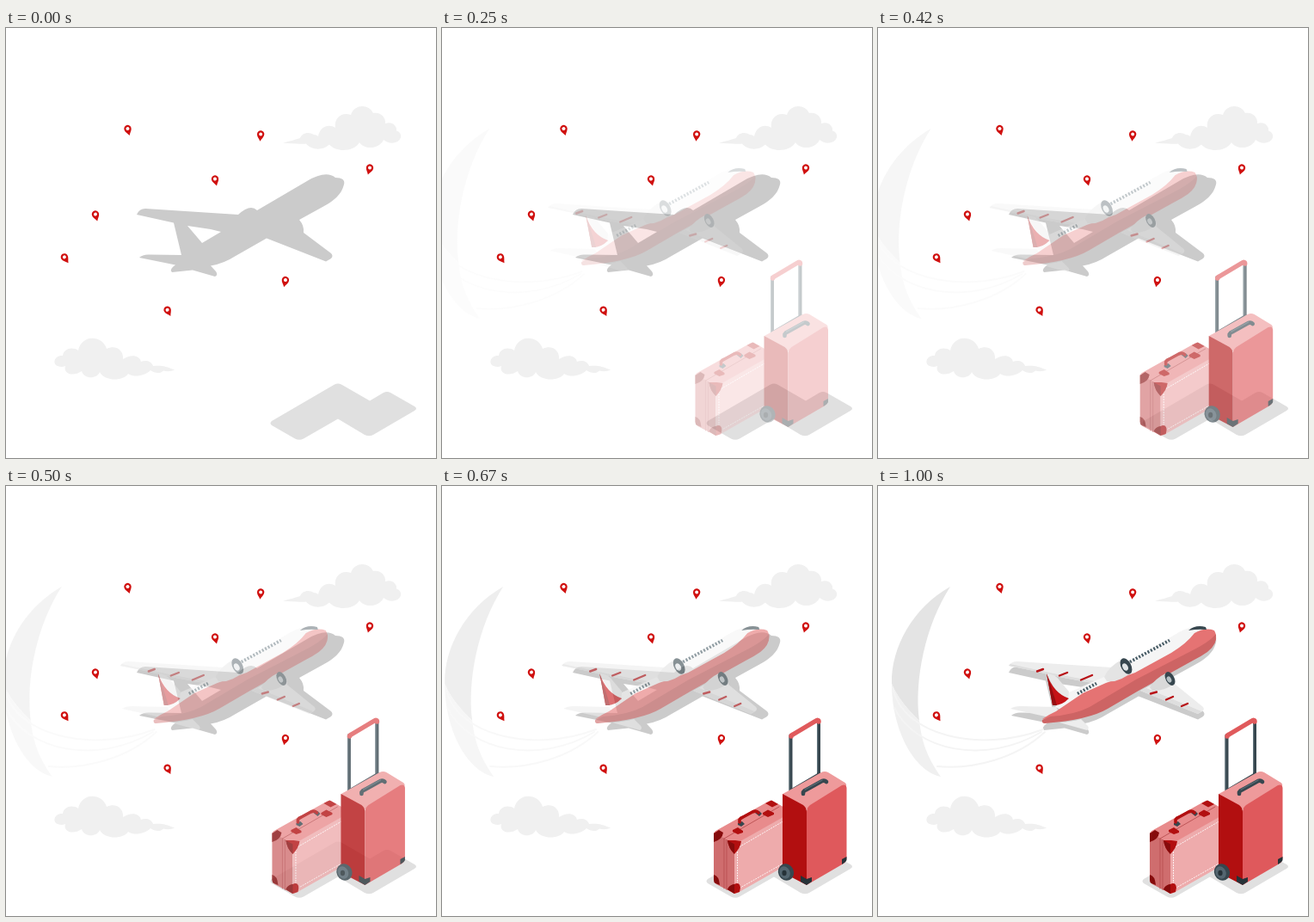
These frames come from a looping animation (500 by 500 pixels, 1040 ms). An HTML page:

```html
<!DOCTYPE html>
<html lang="en">
<head>
<meta charset="utf-8">
<title>Travel</title>
<style>
  html, body { margin: 0; height: 100%; overflow: hidden; background: #fff; }
  svg { display: block; width: 100vw; height: 100vh; }
  #flight, #luggage { opacity: 0; }
  .cloud { fill: #f0f0f0; }
  .line { fill: none; stroke-linecap: round; stroke-linejoin: round; }
  .wing { fill: #ededed; }
  .flap { stroke: #b81418; stroke-width: 2.4; }
  .window { stroke: #455a64; stroke-width: 3.6; stroke-dasharray: 2 1.9; fill: none; }
  .dark { fill: #37474f; }
  .corner { fill: #b20f10; }
  .deep { fill: #860b0c; }
  .stitch { fill: none; stroke: #fff; stroke-width: .9; stroke-dasharray: 1.8 1.2; }
</style>
</head>
<body>
<svg viewBox="0 0 500 500">
  <defs>
    <g id="pin">
      <path fill="#d0100f" d="M0 6.3C-1.5 3-4.2 1-4.2-2A4.2 4.2 0 0 1 4.2-2C4.2 1 1.5 3 0 6.3Z"/>
      <circle cy="-2" r="2" fill="#fff"/>
    </g>
  </defs>

  <path class="cloud" d="M322 134C330 131 337 130 342 128C344 122 352 120 358 124Q361 124 363 126C365 115 375 111 383 116C381 105 390 97 401 101C405 88 422 88 427 99C435 97 442 104 441 111C449 108 455 114 454 119.500C460 121 461 128 456 131.500C451 135 444 134 439 130C434 141 417 142 411 133C405 144 384 145 376 135.500C368 143 355 142 349 134.500C343 135.500 335 133.500 322 134Z"/>
  <path class="cloud" d="M196 397.500C186 393 180 392 171 393C169 387 162 386 157 388C155 380 145 379 136 385C137 375 128 368 117 373C112 357 88 356 84 375C77 370 67 373 66 381C57 380 53 390 60 393Q65 395 69 393C66 402 78 406 88 399C91 409 106 408 109 400C114 411 137 411 142 402C150 407 162 404 168 398C173 402 180 402 183 398.500C188 400 193 399 196 397.500Z"/>

  <path fill="#e0e0e0" d="M309 457L382 414.500Q386 412.500 390 414.500L423 433.500L439 424Q443 422 447 424L475 440Q479 442.500 475 445L427 473Q422 475.500 417 473L386 454.500L346 477.500Q341 480 336 477.500L309 462Q306 459.500 309 457Z"/>
  <path fill="#cbcbcb" fill-rule="evenodd" d="M152 217Q155 210 162 210L270 217Q284 204 292 212L350 178Q372 165 383 174Q395 174 393 182C390 194 381 201 370 207L341 223Q347 230 346 238L378 262Q381 265 378 268L372 271.500L303 244.500L267 265Q253 274 238 276.500L244 283Q247 287 243 289L217 281.500L193 284Q189 281 197 275.500L155 267Q159 263 167 263.500L204 264L195 226.500ZM211 230L228 250L250 237L238 234Z"/>

  <g id="flight">
    <path fill="#e4e4e4" d="M84 117C40 142 15 188 16 230Q24 250 48 273C42 225 55 162 84 117Z"/>
    <path fill="#f0f0f0" d="M16 230C16 282 41 331 73 338C57 315 51 298 48 273Q24 250 16 230Z"/>
    <g class="line" stroke="#f4f4f4" stroke-width="1.900">
      <path d="M17 234C28 290 118 311 192 283"/>
      <path d="M19 258C44 308 124 325 190 286"/>
      <path d="M69 326C112 330 162 316 194 286"/>
    </g>

    <path class="wing" d="M154 259Q158 256 166 256L207 257L213 266L199 269Z"/>
    <path class="wing" d="M152 209Q155 204 162 204L272 211L290 216L262 231Q216 224 186 216Z"/>
    <path fill="#dedede" d="M152 209L186 216Q216 224 262 231L264 229Q212 220 186 214L154 207Z"/>
    <g class="line flap">
      <path d="M185 215.500L192 213"/>
      <path d="M211 220.500L220 217"/>
      <path d="M236 225.500L249 220"/>
    </g>

    <path fill="#f5f5f5" d="M206 257L222 240L265 221L292 204L350 170Q366 161 380 164L392 172L384 187L230 268Z"/>
    <path fill="#e8e8e8" d="M196 218Q207 219 211 226L222 239L221 248Q207 243 196 218Z"/>
    <path fill="#c51216" d="M196 218Q204 241 222 247Q213 256 203 255Z"/>
    <path fill="#960d10" d="M196 218Q204 241 208 255L203 255Z"/>
    <path fill="#e57373" d="M191 271Q198 266 207 262L238 241L265 229L299 217L341 194Q359 183 368 171Q381 164 391 168Q395 174 391 183L365 200L302 235L240 266Z"/>
    <path fill="#cd6464" d="M191 272L200 268Q229 266 246 257L300 225L364 192Q386 181 393 172Q395 184 383 193Q376 198 366 203L303 238L267 259Q245 272 194 276Q190 276 191 272Z"/>
    <path class="dark" d="M361 168Q369 161 381 164L382 167Q372 166 361 168Z"/>
    <path class="window" d="M232 241.500L254 229.500M293 204.500L339 179.500"/>

    <path class="wing" d="M211 275Q225 274 236 271L244 279Q246 282 243 284L218 277Z"/>
    <path class="wing" d="M305 238L341 219Q347 225 346 231L378 257Q380 260 377 262L372 265Z"/>
    <path fill="#dedede" d="M305 238L372 265L376 262L312 235Z"/>
    <g class="line flap">
      <path d="M317 241.500L324 239.500"/>
      <path d="M335 248.500L343 245"/>
      <path d="M353 256L360 253"/>
    </g>

    <path fill="#e4e4e4" d="M263 222Q268 210 285 201L295 216Q281 229 266 227Z"/>
    <ellipse class="dark" cx="288.500" cy="209.500" rx="5.800" ry="10" transform="rotate(-28 288.500 209.500)"/>
    <ellipse cx="287.500" cy="210.500" rx="3" ry="4.500" fill="#e0e4e6" transform="rotate(-28 287.500 210.500)"/>
    <path fill="#d9d9d9" d="M316 234Q322 224 336 217L344 230Q332 239 319 238Z"/>
    <ellipse class="dark" cx="339.500" cy="224" rx="5" ry="8.500" transform="rotate(-28 339.500 224)"/>
    <ellipse cx="338.500" cy="225" rx="2.500" ry="3.800" fill="#b7c0c4" transform="rotate(-28 338.500 225)"/>
  </g>

  <g id="luggage">
    <path fill="#e88b8c" d="M316 404Q317 401 320 400L380 366.500Q383 365 386 367L402 376L402 384L342 418Z"/>
    <path fill="#cf6d6e" d="M316 403L340 416V474L319 463Q316 461 316 458Z"/>
    <path fill="#eeabac" d="M340 417L402 382V440L344 473L340 474Z"/>
    <path class="line" stroke="#b95052" stroke-width=".9" d="M328 410V468M331 411.500V469.500M328 410L392 373"/>
    <path class="stitch" d="M343.500 472V421L400 388M343.500 469L400 437"/>
    <path class="deep" d="M316 404L322 400L327 403Q326 411 316 414ZM316 452Q322 453 323 464L318 462Q316 461 316 458Z"/>
    <path class="corner" d="M332 412L341 412L348 413Q347 421 340 428Q333 421 332 412ZM332 469Q334 464 340 463Q346 460 347 467L346 472L340 474ZM376 369L383 365.500L391 370L384 373.500Z"/>
    <path class="deep" d="M332 412L340 416.500V428Q333 421 332 412ZM332 469Q334 464 340 463V474Z"/>
    <path class="corner" d="M338 400L344 397L350 401V403L344 405L338 402ZM373 380L379 376.500L386 380V382L379 385L373 382Z"/>
    <path class="dark" d="M344 392L349 390L352 393L348 396L344 394ZM364 380L369 378L372 381L369 384Z"/>
    <path class="line" stroke="#b20f10" stroke-width="3.600" d="M346 391V388Q347 386 350 385L361 379Q366 377 368 380"/>

    <path class="line" stroke="#37474f" stroke-width="2.200" d="M405 354L439 334"/>
    <path class="line" stroke="#37474f" stroke-width="4" stroke-linecap="butt" d="M405.500 290V356M438 274V336"/>
    <path class="line" stroke="#62757e" stroke-width="1" d="M404 292V353M436.500 277V333"/>
    <path class="line" stroke="#e05a5c" stroke-width="5.500" d="M406 291Q406 290 408 289L434 273.500Q438 271 438 274"/>

    <path fill="#ee9a9b" d="M396 359Q397 357 400 356L441 333Q445 331 449 333L467 344Q471 346 470 349L424 376Z"/>
    <path fill="#b20f10" d="M396 358L420 371Q424 374 424 379V464L399 451Q396 449 396 446Z"/>
    <path fill="#df595c" d="M424 464V379Q424 374 428 371L465 348Q470 346 470.500 351V433Q470 437 467 439Z"/>
    <path fill="#263238" d="M417 453L424 457L430 455V460L424 464L417 460ZM465 434L470.500 431V435Q470 437 465 440Z"/>
    <path class="line" stroke="#37474f" stroke-width="4.600" d="M420 358V356Q421 354 424 353L442 343Q445 342 447 344"/>
    <path class="line" stroke="#5b6e77" stroke-width="1.200" d="M422 353L442 342"/>
    <ellipse cx="400" cy="449" rx="9" ry="10" fill="#37474f" transform="rotate(-25 400 449)"/>
    <ellipse cx="398.500" cy="449.500" rx="6" ry="7.500" fill="#546670" transform="rotate(-25 398.500 449.500)"/>
    <ellipse cx="398" cy="450" rx="2.600" ry="3.300" fill="#263238"/>
  </g>

  <g id="pins">
    <use href="#pin" transform="translate(142 119) rotate(-15)"/>
    <use href="#pin" transform="translate(296 125.500) rotate(5)"/>
    <use href="#pin" transform="translate(422.500 164.500) rotate(15)"/>
    <use href="#pin" transform="translate(243.500 177.500) rotate(-14)"/>
    <use href="#pin" transform="translate(104.500 218.500) rotate(-16)"/>
    <use href="#pin" transform="translate(69 268) rotate(-34)"/>
    <use href="#pin" transform="translate(324.500 295) rotate(12)"/>
    <use href="#pin" transform="translate(188.500 329.500) rotate(-27)"/>
  </g>
</svg>
<script>
  const LOOP = 1040, STEPS = 25;
  const flight = document.getElementById('flight');
  const luggage = document.getElementById('luggage');

  const curve = (u, a, b) => 3 * (1 - u) ** 2 * u * a + 3 * (1 - u) * u * u * b + u ** 3;

  // Cubic bezier easing (.36, -.01, .5, 1.38), solved by bisection
  function overshoot(p) {
    let low = 0, high = 1;
    for (let i = 0; i < 24; i++) {
      const mid = (low + high) / 2;
      if (curve(mid, .36, .5) < p) low = mid; else high = mid;
    }
    return curve(high, -.01, 1.38);
  }

  function place(node, x, opacity) {
    node.setAttribute('transform', `translate(${x.toFixed(2)} 0)`);
    node.style.opacity = Math.max(0, Math.min(1, opacity));
  }

  function draw(now) {
    const step = Math.min(STEPS - 1, Math.floor((now % LOOP + 5) * STEPS / LOOP));
    const p = (step + 1) / STEPS;
    const shown = step > 1 ? 1 : 0;
    const eased = overshoot(p);
    place(flight, -40 * (1 - p), shown * p ** 1.35);
    place(luggage, -30 * (1 - eased), shown * eased);
  }

  const start = performance.now();
  function tick() {
    draw(performance.now() - start);
    requestAnimationFrame(tick);
  }
  tick();
</script>
</body>
</html>
```
